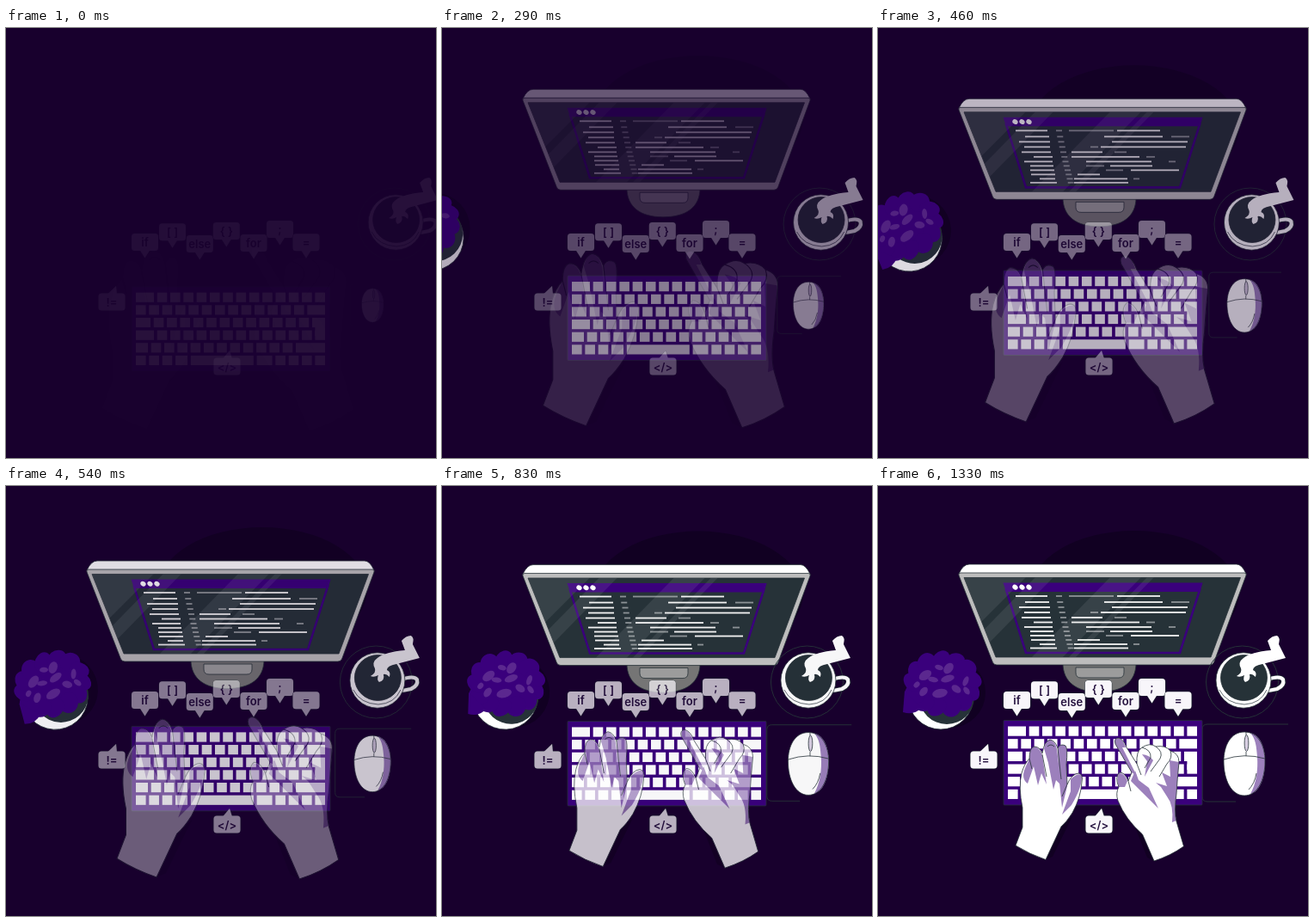
An HTML page with a canvas for the animation above (1.62 s loop, 500 by 500 pixels).

```html
<!DOCTYPE html>
<html lang="en">
<head>
<meta charset="utf-8">
<title>Coding desk</title>
<style>
html, body { margin: 0; width: 100%; height: 100%; overflow: hidden; background: #18002d; }
canvas { display: block; width: 500px; height: 500px; }
</style>
</head>
<body>
<canvas id="stage" width="500" height="500"></canvas>
<script>
const LOOP = 1620, STEP = 1000 / 24;
const BG = '#18002d', PURPLE = '#3a007c', SHADE = '#9c80bc', SLATE = '#263238', WHITE = '#fff';

const stage = document.getElementById('stage').getContext('2d');
const scratch = document.createElement('canvas');
scratch.width = scratch.height = 500;
const g = scratch.getContext('2d');

const clamp = v => Math.max(0, Math.min(1, v));

function shape(d, fill, stroke, width = 0.8) {
  const path = new Path2D(d);
  if (fill) { g.fillStyle = fill; g.fill(path); }
  if (stroke) { g.strokeStyle = stroke; g.lineWidth = width; g.stroke(path); }
}

function oval(x, y, rx, ry, fill, stroke, angle = 0, width = 0.8) {
  g.beginPath();
  g.ellipse(x, y, rx, ry, angle, 0, Math.PI * 2);
  if (fill) { g.fillStyle = fill; g.fill(); }
  if (stroke) { g.strokeStyle = stroke; g.lineWidth = width; g.stroke(); }
}

// Draws a group on its own layer so that it fades as one piece.
function layer(alpha, place, draw) {
  g.setTransform(1, 0, 0, 1, 0, 0);
  g.clearRect(0, 0, 500, 500);
  place();
  draw();
  stage.globalAlpha = clamp(alpha);
  stage.drawImage(scratch, 0, 0);
}

const shift = (x, y) => () => g.translate(x, y);
const zoom = (x, y, s) => () => { g.translate(x, y); g.scale(s, s); g.translate(-x, -y); };

// Rises, overshoots slightly and settles.
const POP = [[0, 0], [120, .06], [290, .34], [380, .54], [540, .865], [710, 1.03], [1000, 1], [1620, 1]];
function pop(t) {
  const i = Math.max(0, POP.findIndex(p => p[0] > t) - 1);
  const slope = k => {
    if (k < 1 || k > 4) return 0;
    const a = POP[k - 1], b = POP[k + 1];
    return (b[1] - a[1]) / (b[0] - a[0]);
  };
  const [t0, v0] = POP[i], [t1, v1] = POP[i + 1];
  const d = t1 - t0, u = (t - t0) / d, w = 1 - u;
  return v0 * w * w * (1 + 2 * u) + v1 * u * u * (3 - 2 * u) + d * u * w * (slope(i) * w - slope(i + 1) * u);
}

// Each row: height, sidebar start and end, then bright and dim code segments.
const CODE = [
  [128, 160, 197, [278, 328], [222, 274]],
  [135, 171, 199, [263, 331], [341, 362]],
  [141, 164, 200, [272, 360], []],
  [147, 170, 200, [259, 358], [247, 256]],
  [153, 167, 201, [225, 261], [275, 289]],
  [158.5, 181, 203, [225, 304], [312, 322]],
  [164, 170, 203, [242, 318], [338, 346]],
  [169, 177, 204, [270, 319], [242, 263]],
  [174, 177, 205, [294, 350], [265, 285]],
  [179, 178, 206, [232, 258], []],
  [184, 188, 206, [228, 290], [297, 304]],
  [188.5, 177, 208, [228, 291], []]
];

function dash(x0, x1, y, color) {
  g.fillStyle = color;
  g.fillRect(x0, y - 0.9, x1 - x0, 1.8);
}

function drawMonitor() {
  oval(298, 125, 122, 73, 'rgba(8,0,16,.35)');
  shape('M215 206 C215 228 231 239.500 257 239.500 C284 239.500 300 228 300 206 Z', '#757575', SLATE);
  shape('M230 211 H286 V217 Q286 223 280 223 H236 Q230 223 230 217 Z', '#9c9c9c', SLATE);
  shape('M94 102 Q99 91 106 91 H417 Q423 91 428 102 Z', WHITE, SLATE);
  shape('M96 101 H426 Q429 101 428 104 L391 204 Q390 208 386 208 H138 Q134 208 133 204 L94 104 Q93 101 96 101 Z', '#bdbdbd', SLATE);
  const screen = 'M100 106.500 H421.500 L387 199 H137 Z';
  shape(screen, SLATE, SLATE);
  shape('M149 121 H374 L351 194 H172 Z', null, PURPLE, 2.6);
  shape('M145.500 112.500 H377.500 L374.500 123 H149 Z', PURPLE);
  for (const x of [159.5, 167.5, 175.5]) oval(x, 117.7, 3.3, 2.7, WHITE, null, .6);
  CODE.forEach(([y, from, to, bright, dim], i) => {
    dash(from, to, y, '#f2f2f2');
    dash(207 + i * 1.25, 214 + i * 1.25, y, '#8c9296');
    dash(...bright, y, '#f2f2f2');
    if (dim.length) dash(...dim, y, '#8c9296');
  });
  g.save();
  g.clip(new Path2D(screen));
  shape('M90 106 H172 L78 200 Z M183 106 H204 L112 200 H91 Z M270 106 H306 L214 200 H178 Z M313 106 H321 L229 200 H221 Z', 'rgba(255,255,255,.08)');
  g.restore();
}

const keys = n => Array(n).fill(11.6);
const KEY_ROWS = [
  [21, ...keys(13)],
  [...keys(13), 20.7],
  [17, ...keys(12), 15],
  [21, ...keys(13)],
  [14, ...keys(11), 34],
  [...keys(3), 14, 73, 18, ...keys(4)]
];

function drawKeyboard() {
  shape('M147 272.500 H376 Q377 272.500 377 273.500 V370 Q377 371 376 371 H147 Q146 371 146 370 V273.500 Q146 272.500 147 272.500 Z', PURPLE, SLATE);
  g.fillStyle = WHITE;
  KEY_ROWS.forEach((row, r) => {
    const gap = (220 - row.reduce((a, b) => a + b)) / (row.length - 1);
    let x = 151;
    for (const w of row) {
      g.fillRect(x, 279.5 + r * 14.65, w, 11.2);
      x += w + gap;
    }
  });
  g.fillRect(359.4, 315, 11.6, 15);
}

function drawMouse() {
  shape('M477 277 H383 Q377 277 377 283 V361 Q377 367 383 367 H416', null, SLATE, 1);
  const body = 'M426 286 C442 286 450 302 450 320 C450 342 441 360 426 360 C411 360 402 342 402 320 C402 302 410 286 426 286 Z';
  shape(body, WHITE);
  shape('M433 287 C445 290 450 304 450 320 C450 342 443 356 433 358 C440 346 442 330 441 315 C440 302 439 294 433 287 Z', SHADE);
  shape(body, null, SLATE);
  shape('M402 318 Q426 310 450 317 M428 286 V290 M428 309 V314 M440 334 Q438 346 431 353', null, SLATE);
  oval(428.5, 299, 2.4, 9.5, '#d8cfe2', SLATE);
}

function drawCoffee() {
  const handle = 'M453 225 Q467 220 471 225 Q473 232 464 236 Q456 238 450 238';
  oval(423.5, 228, 42, 42, null, SLATE, 0, 1);
  shape(handle, null, SLATE, 5.8);
  shape(handle, null, WHITE, 4.2);
  oval(425, 226, 32, 32.2, WHITE, SLATE);
  oval(425.5, 223, 27, 26.5, SLATE, SLATE);
  shape('M397 237 Q405 253 426 254 Q445 253 452 237', null, SLATE, .7);
  shape('M453 180 Q458 174 464 174 Q468 176 466 184 L474 200 L447 207 Q436 209 436 214 Q441 216 439 222 Q435 218 432 219 Q434 226 427 228 Q424 225 426 220 Q421 223 417 221 Q424 217 422 212 Q418 205 425 200 Q434 193 457 191 Z', WHITE);
}

const LEAVES = [
  [82, 212, 7, 5, -.9], [71, 211, 5, 3, .3], [55, 220, 8, 5, -.6], [64, 225, 6, 3, .2], [81, 224, 8, 4, -.3],
  [53, 239, 6, 4, -.9], [72, 241, 9, 5, -.2], [91, 236, 6, 4, .6], [102, 227, 3, 6, .4], [103, 238, 3, 5, -.6], [45, 231, 4, 3, -.8]
];

function drawPlant() {
  oval(84, 240, 41, 41, 'rgba(5,0,10,.3)');
  oval(73, 245, 38, 38, WHITE, SLATE);
  oval(80, 245, 32, 32, SLATE);
  oval(74, 231, 39, 31, PURPLE);
  for (let i = 0; i < 13; i++) {
    const a = i * Math.PI * 2 / 13 + .3;
    oval(75 + 35 * Math.cos(a), 230 + 28 * Math.sin(a), 12, 9 + i % 3, PURPLE, null, a + .8);
  }
  shape('M31 238 L29 263 Q42 267 50 258 Z', PURPLE);
  for (const [x, y, rx, ry, a] of LEAVES) oval(x, y, rx, ry, '#5b288f', null, a);
}

function drawHands() {
  shape('M213 395 L226 384 L203 431 L195 434 Z M308 405 L298 394 L313 432 L321 436 Z', 'rgba(8,0,16,.35)');

  const left = 'M160 418 L168 397 L168 374 Q163 350 167 334 Q170 323 176 317 Q176 304 182 303 Q188 303 191 311 Q193 297 200 295 Q206 296 209 305 Q212 299 218 302 Q221 305 219 324 L220 347 Q225 335 233 334 Q239 335 237 344 Q236 362 226 380 Q219 391 213 396 L195 434.500 Q176 428 160 418 Z';
  shape(left, WHITE);
  shape('M176 317 Q176 304 182 303 Q188 304 191 313 L196 347 L190 334 L186 348 L181 326 L174 346 Q166 340 171 328 Z', SHADE);
  shape('M193 305 Q196 295 200 295 Q206 297 208 306 L213 348 L207 342 L204 353 L198 322 Z', SHADE);
  shape('M209 306 Q212 299 218 302 Q221 306 219 324 L220 349 L214 374 L211 345 Z', SHADE);
  shape('M224 341 Q232 333 237 336 Q238 349 225 371 L214 382 L224 355 Z', SHADE);
  shape(left, null, SLATE);
  shape('M191 312 L196 338 M209 305 L213 341 M176 317 L179 329 M220 347 L214 361 M197 303 Q201 299 205 303', null, SLATE);

  const right = 'M321 436 L307.500 405 Q288 388 279 366 Q276 357 280 350 Q275 338 281 333 Q287 333 291 343 L295 333 L276 300 Q274 293 280 293 Q286 295 289 304 L301 323 Q300 308 307 304 Q316 298 323 303 Q334 301 340 308 Q350 311 350 321 Q348 341 347 358 Q344 378 347 390 L355.500 419 Q340 430 321 436 Z';
  shape(right, WHITE);
  shape('M276 300 Q274 293 280 293 Q286 296 288 304 L284 304 L301 337 L295 333 Z M280 334 Q286 333 290 343 L287 350 L280 350 Q277 340 280 334 Z', SHADE);
  shape('M294 343 L307 356 L326 375 L315 351 L303 342 L299 331 Z M307 312 Q316 313 320 319 L310 338 L313 320 Z', SHADE);
  shape('M350 321 Q348 341 347 358 Q344 378 347 389 L342 391 Q344 371 336 361 L329 350 L323 345 L336 349 L330 333 L340 338 L339 319 Z', SHADE);
  shape(right, null, SLATE);
  shape('M301 323 L306 336 M307 304 Q318 307 317 316 L310 328 M323 303 Q332 309 328 317 L317 332 M340 308 Q343 316 336 323 L327 338 M291 343 L294 355', null, SLATE);
}

const BUBBLES = [
  ['if', 161.5, 249], ['[ ]', 193.5, 237.3], ['else', 225.3, 251], ['{ }', 256.3, 236],
  ['for', 288, 250], [';', 318.5, 234], ['=', 349, 249.3], ['!=', 123, 318.5, 5], ['</>', 257, 393.5, 3]
];

function drawBubbles() {
  g.font = '600 13px Inter, "Open Sans", sans-serif';
  g.textAlign = 'center';
  g.textBaseline = 'middle';
  for (const [label, x, y, tip] of BUBBLES) {
    const tail = tip
      ? `M${x - 5} ${y - 9} L${x + tip} ${y - 18.5} L${x + 6} ${y - 9} Z`
      : `M${x - 6} ${y + 9} L${x} ${y + 18.5} L${x + 6} ${y + 9} Z`;
    const box = `M${x - 12} ${y - 10} h24 q3.500 0 3.500 3.500 v13 q0 3.500 -3.500 3.500 h-24 q-3.500 0 -3.500 -3.500 v-13 q0 -3.500 3.500 -3.500 Z`;
    shape(tail + box, null, SLATE, 1);
    shape(box, '#f8f6fa');
    shape(tail, '#f8f6fa');
    g.fillStyle = '#25123f';
    g.fillText(label, x, y + 1.2);
  }
}

function render(time) {
  const t = Math.floor((time + 4.9) / STEP) * STEP;
  const x = clamp((t + STEP) / (1000 + STEP));
  const easeOut = Math.sin(x * Math.PI / 2);
  const easeIn = 1 - Math.cos(x * Math.PI / 2);
  const bounce = pop(t), rest = 1 - bounce;

  stage.globalAlpha = 1;
  stage.fillStyle = BG;
  stage.fillRect(0, 0, 500, 500);

  layer(bounce, shift(0, -30 * rest), drawMonitor);
  layer(.5 + bounce / 2, () => {
    g.translate(75 - 140 * Math.max(0, rest), 237);
    g.rotate(-1.48 * (1 - easeOut));
    g.translate(-75, -237);
  }, drawPlant);
  layer(easeOut, shift(30 * (1 - easeOut), 0), drawCoffee);
  layer(easeOut, zoom(426.5, 322, .5 + easeOut / 2), drawMouse);
  layer(easeOut, shift(0, 30 * (1 - easeOut)), drawKeyboard);
  layer(easeIn, zoom(257.5, 370, 1.5 - easeIn / 2), drawHands);
  layer(.05 + t / 1250, () => {}, drawBubbles);
}

const start = performance.now();
function tick() {
  render((performance.now() - start) % LOOP);
  requestAnimationFrame(tick);
}
tick();
</script>
</body>
</html>
```
